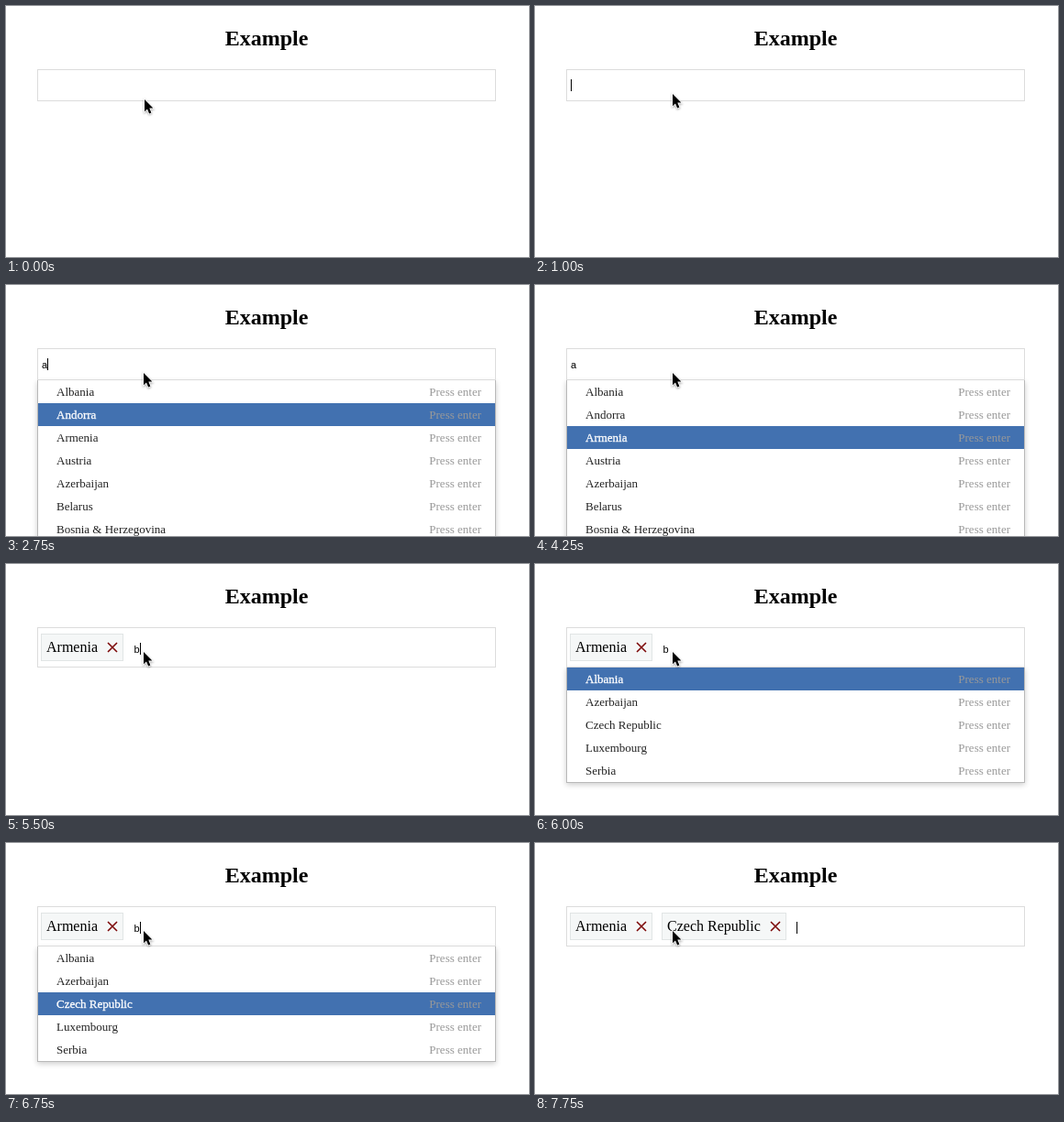
Recreate the animation shown at these times as an HTML page. Size 570x274 px, loop 8000 ms.

```html
<!DOCTYPE html>
<html lang="en">
<head>
<meta charset="utf-8">
<title>Tag input</title>
<style>
html, body { margin: 0; width: 100%; height: 100%; overflow: hidden; background: #fff; }
#stage { position: relative; width: 570px; height: 274px; overflow: hidden;
  font-family: "Liberation Serif", "Times New Roman", serif; color: #222; }
#stage div, #stage svg { position: absolute; box-sizing: border-box; white-space: pre; }
#stage h1 { position: absolute; margin: 0; left: 34px; top: 22px; width: 500px;
  font-size: 24px; line-height: 27px; text-align: center; color: #000; }
.field { left: 34px; top: 69px; width: 500px; border: 1px solid #dcdcdc; }
.tag { top: 76px; height: 30px; padding-left: 5px; border: 1px solid #e1e5e5;
  background: #f5f7f7; font-size: 16px; line-height: 28px; color: #000; }
.tag svg { right: 5px; top: 8px; }
.typed { font: 11px/13px "Liberation Sans", Arial, sans-serif; color: #000; }
.caret { width: 1px; height: 13px; background: #000; }
.menu { left: 34px; width: 500px; border: 1px solid #b8b8b8; border-top: 0;
  background: #fff; box-shadow: 0 2px 6px rgba(0, 0, 0, .2); }
.row { left: 0; width: 498px; height: 25px; padding: 0 15px 0 20px;
  font-size: 13px; line-height: 25px; }
.row span { position: absolute; right: 15px; color: #999; -webkit-text-stroke: 0; }
.row.on { background: #4271b0; color: #fff; -webkit-text-stroke: .3px #fff; }
.row.wait { padding-left: 10px; color: #777; }
#stage #pointer { left: 0; top: 0; overflow: visible; filter: drop-shadow(0 1px 1px rgba(0, 0, 0, .35)); }
</style>
</head>
<body>
<div id="stage">
  <h1>Example</h1>
  <div id="view"></div>
  <svg id="pointer" width="12" height="18">
    <path d="M0 0V13.2L3 10.4L5.1 15.4L7.4 14.4L5.3 9.6H9.4Z" fill="#000" stroke="#fff" stroke-width="1.6" paint-order="stroke"/>
  </svg>
</div>
<script>
const LOOP = 8000;
const LISTS = {
  a: ["Albania", "Andorra", "Armenia", "Austria", "Azerbaijan", "Belarus", "Bosnia & Herzegovina"],
  b: ["Albania", "Azerbaijan", "Czech Republic", "Luxembourg", "Serbia"]
};
const TAGS = [
  { name: "Armenia", x: 38, w: 90 },
  { name: "Czech Republic", x: 138, w: 136 }
];
const INPUT_X = [39, 139, 285];
const WAIT = -1, NONE = null;

// start ms, tags, typed text, caret shown, menu (selected row, WAIT or NONE)
const STEPS = [
  [0, 0, "", 0, NONE],
  [1000, 0, "", 1, NONE],
  [1500, 0, "", 0, NONE],
  [1750, 0, "a", 1, NONE],
  [2000, 0, "a", 1, WAIT],
  [2250, 0, "a", 0, 0],
  [2750, 0, "a", 1, 1],
  [3000, 0, "a", 1, 2],
  [3250, 0, "a", 0, 2],
  [3750, 0, "a", 1, 2],
  [4250, 0, "a", 0, 2],
  [4500, 1, "", 1, NONE],
  [5000, 1, "", 0, NONE],
  [5500, 1, "b", 1, NONE],
  [5750, 1, "b", 1, WAIT],
  [6000, 1, "b", 0, 0],
  [6500, 1, "b", 1, 1],
  [6750, 1, "b", 1, 2],
  [7000, 1, "b", 0, 2],
  [7500, 2, "", 1, NONE]
];

const view = document.getElementById("view");
const pointer = document.getElementById("pointer");
const cross = '<svg width="12" height="12"><path d="M1 1L11 11M11 1L1 11" stroke="#7d0a0a" stroke-width="1.6"/></svg>';
const box = (cls, style, inner = "") => `<div class="${cls}" style="${style}">${inner}</div>`;
const esc = s => s.replace("&", "&amp;");

function menuHtml(top, text, sel) {
  if (sel === NONE) return "";
  const names = sel === WAIT ? ["Loading..."] : LISTS[text];
  const rows = names.map((name, i) => sel === WAIT
    ? box("row wait", "top:0", name)
    : box(i === sel ? "row on" : "row", `top:${i * 25}px`, esc(name) + "<span>Press enter</span>"));
  return box("menu", `top:${top}px;height:${names.length * 25 + 1}px`, rows.join(""));
}

function render([, count, text, caret, sel]) {
  const bottom = count ? 113 : 104;
  const x = INPUT_X[count], y = count ? 86 : 80;
  const caretX = x + (text ? 6 + count : 0);
  view.innerHTML =
    menuHtml(bottom, text, sel) +
    box("field", `height:${bottom - 69}px`) +
    TAGS.slice(0, count).map(t => box("tag", `left:${t.x}px;width:${t.w}px`, t.name + cross)).join("") +
    box("typed", `left:${x + count * .5}px;top:${y + 1}px`, text) +
    (caret ? box("caret", `left:${caretX}px;top:${y}px`) : "");
}

let shown;
function tick() {
  const t = performance.now() % LOOP;
  const step = STEPS.findLast(s => s[0] <= t);
  if (step !== shown) render(shown = step);
  pointer.style.transform = t < 250 ? "translate(151px,102px)" : "translate(150px,96px)";
  requestAnimationFrame(tick);
}
tick();
</script>
</body>
</html>
```
